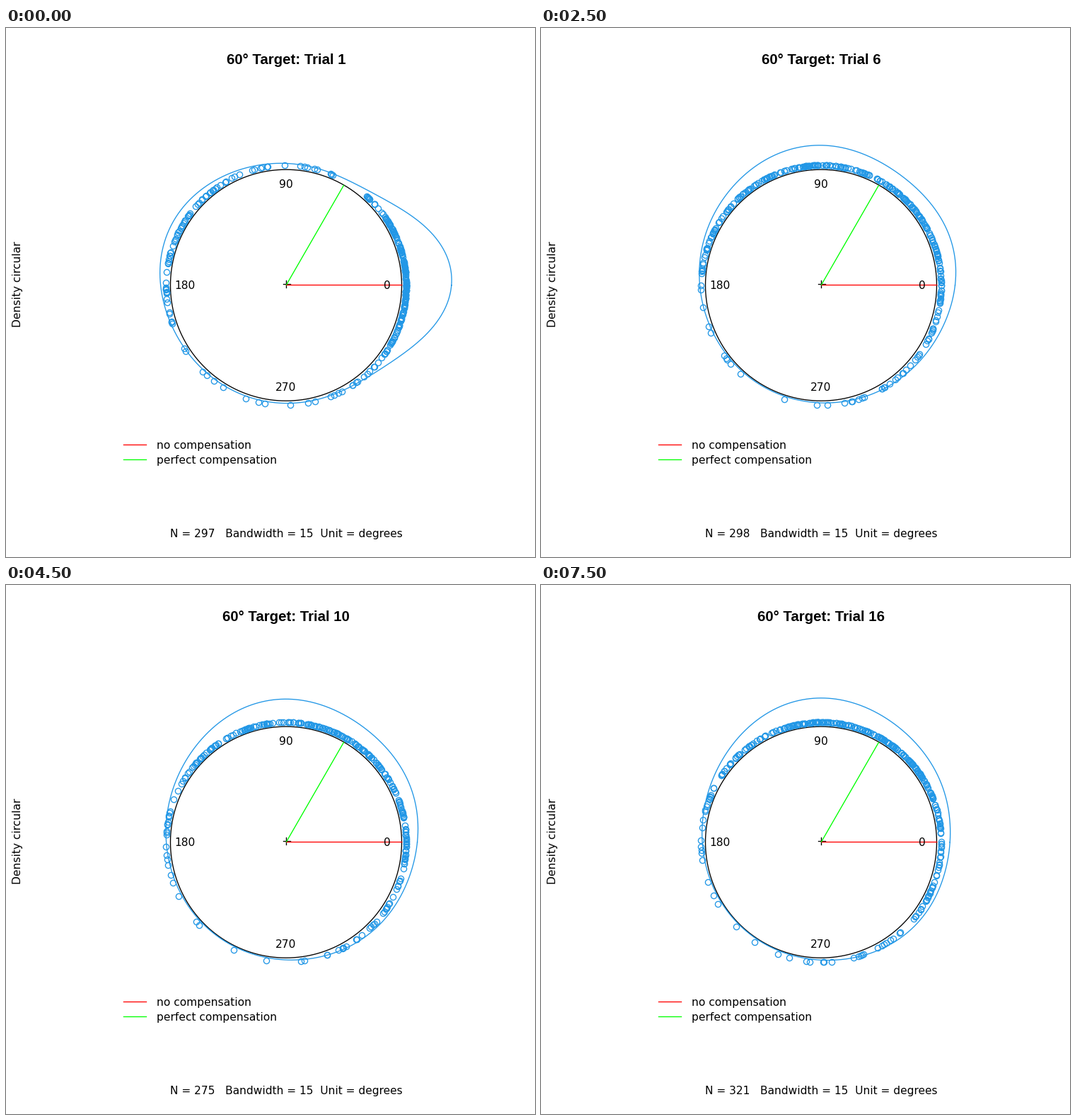
Animation, 748 px wide and 748 px high, one loop 8 s. Source, as a matplotlib script:

```python
import matplotlib.pyplot as plt
import numpy as np
from matplotlib.animation import FuncAnimation

SIZE, DPI = 748, 64
PT = 72 / DPI                      # points per pixel
CX, CY, R = 395.5, 363.2, 163.5
DOT_R = 169.7
BLUE, RED, GREEN = "#2297E6", "#FF0000", "#00FF00"

# Sample size shown in the footer, one per trial
COUNTS = [297, 292, 288, 290, 294, 298, 305, 316, 296, 275, 301, 310, 306, 312, 315, 321]

ANGLES = np.linspace(0, 360, 721)


def settle(trial, start, end, rate):
    """Exponential approach from start (trial 1) to end."""
    return end + (start - end) * np.exp(-(trial - 1) / rate)


def bump(center, width, height):
    gap = (ANGLES - center + 180) % 360 - 180
    return height * np.exp(-0.5 * (gap / width) ** 2)


def density(trial):
    """Responses shift from 0 degrees towards the far side as trials go on."""
    uncorrected = bump(settle(trial, 3, 32, 6), settle(trial, 23, 28, 0.5),
                       settle(trial, 38, 0, 0.5) + 29.5 - 0.65 * trial)
    corrected = bump(92, 32, settle(trial, 4, 37, 3))
    opposite = bump(154 - 0.6 * trial, 30, settle(trial, 16, 5, 6))
    below = bump(325, 30, settle(trial, 2, 15, 8))
    return uncorrected + corrected + opposite + below + settle(trial, 3, 0.6, 4)


def observations(trial, height):
    cdf = np.cumsum(height)
    draws = np.random.default_rng(60 + trial).random(COUNTS[trial - 1])
    return np.interp(draws, cdf / cdf[-1], ANGLES)


def polar(deg, radius):
    a = np.radians(deg)
    return CX + radius * np.cos(a), CY - radius * np.sin(a)


fig = plt.figure(figsize=(SIZE / DPI, SIZE / DPI), dpi=DPI, facecolor="white")
ax = fig.add_axes([0, 0, 1, 1])
ax.set(xlim=(-0.5, SIZE - 0.5), ylim=(SIZE - 0.5, -0.5))
ax.axis("off")


def line(xs, ys, color):
    return ax.plot(xs, ys, color=color, lw=1.33 * PT)[0]


def label(x, y, text, size=15.5, ha="center", va="baseline", **kw):
    kw.setdefault("family", "DejaVu Sans")
    return ax.text(x, y, text, fontsize=size * PT, ha=ha, va=va, **kw)


line(*polar(ANGLES, R), "black")
line([391.5, 401.5], [362, 362], "black")
line([396, 396], [357, 367], "black")
for deg in range(0, 360, 90):
    x, y = polar(deg, 143.3)
    label(x, y + 5.6, str(deg))

dots = ax.plot([], [], "o", ms=8.2 * PT, mfc="none", mec=BLUE, mew=1.33 * PT)[0]
curve = line([], [], BLUE)

line([396, 559], [363, 363], RED)
line([396, 477], [362.5, 222], GREEN)
for y, color, text in ((589, RED, "no compensation"),
                       (610, GREEN, "perfect compensation")):
    line([166, 198], [y, y], color)
    label(212.5, y + 6, text, ha="left")

label(16, 361.5, "Density circular", va="center", rotation=90)
title = label(CX, 50.5, "", 20.4, family="Liberation Sans", weight="bold")
footer = label(CX, 720, "", 15.4)


def draw(i):
    trial = i + 1
    height = density(trial)
    dots.set_data(*polar(observations(trial, height), DOT_R))
    curve.set_data(*polar(ANGLES, R + height))
    title.set_text(f"60° Target: Trial {trial}")
    footer.set_text(f"N = {COUNTS[i]}   Bandwidth = 15  Unit = degrees")
    return dots, curve, title, footer


anim = FuncAnimation(fig, draw, frames=len(COUNTS), interval=500,
                     repeat=True, repeat_delay=0)
plt.show()
```
